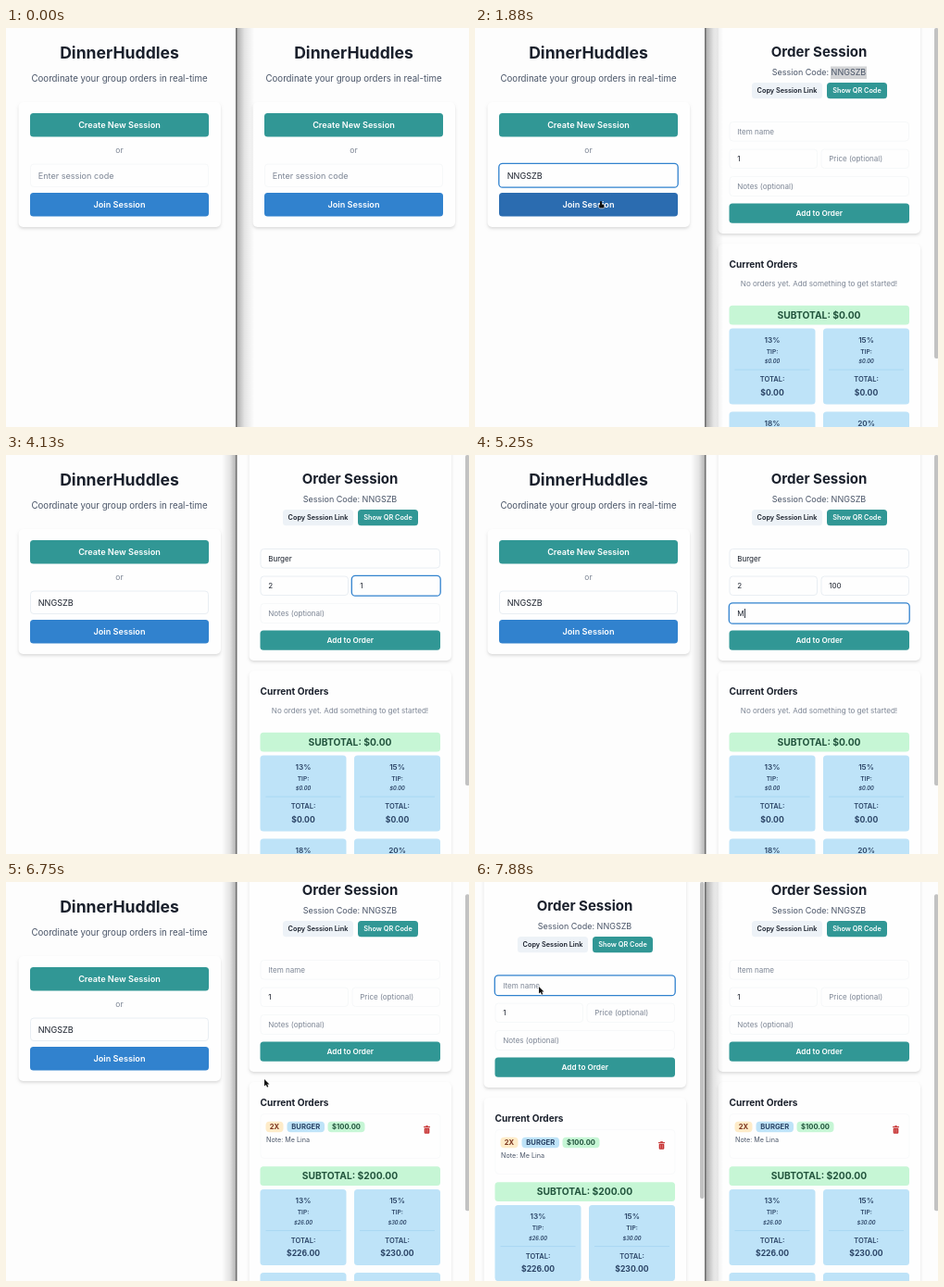
Write an HTML page with a canvas that moves like this. It is 500 px wide and 431 px high and loops after 8 s.

```html
<!DOCTYPE html>
<html lang="en">
<head>
<meta charset="utf-8">
<title>Group order demo</title>
<style>
  html, body { margin: 0; width: 100%; height: 100%; overflow: hidden; background: #fdfdfd; }
  canvas { display: block; }
</style>
</head>
<body>
<canvas id="stage" width="500" height="431"></canvas>
<script>
const ctx = document.getElementById('stage').getContext('2d');
const W = 500, H = 431, LOOP = 8000, STEP = 125, PANE = 253;
const CODE = 'NNGSZB', NOTE = 'Me Lina';
const TEXT_DROP = .6;
const C = {
  page: '#fdfdfd', card: '#fefefe', ink: '#1a202c', body: '#4a5568', hint: '#7c8594',
  line: '#e9eef3', faint: '#f6f8f9', teal: '#319795', tealDark: '#2c7a7b',
  blue: '#3182ce', blueDark: '#2b6cb0', sky: '#bee3f8', skyInk: '#2a4365',
  mint: '#c6f6d5', mintInk: '#22543d'
};

// Pointer path: step, x, y
const POINTER = [
  [1, 80, 140], [3, 362, 106], [7, 361, 105], [9, 402, 47], [10, 402, 47],
  [12, 110, 158], [13, 112, 160], [15, 136, 187], [17, 138, 188], [21, 345, 60],
  [22, 345, 108], [25, 312, 137], [27, 304, 140], [47, 378, 185], [48, 375, 197],
  [50, 374, 200], [54, 279, 213], [57, 130, 190], [59, 128, 188], [62, 69, 113], [64, 69, 113]
];
const HIDDEN = [[0, 1], [23, 25], [28, 47]];

const within = (k, a, b) => k >= a && k < b;

function typed(text, k, start, end) {
  const part = (k - start + 1) / (end - start + 1);
  return text.slice(0, Math.floor(text.length * Math.max(0, Math.min(1, part))));
}

function box(x, y, w, h, fill, r = 3.5, stroke, width = 1) {
  ctx.beginPath();
  ctx.roundRect(x, y, w, h, r);
  if (fill) { ctx.fillStyle = fill; ctx.fill(); }
  if (stroke) { ctx.strokeStyle = stroke; ctx.lineWidth = width; ctx.stroke(); }
}

function text(str, x, y, size, color, { weight = 400, align = 'left', style = '' } = {}) {
  ctx.font = `${style} ${weight} ${size}px Inter, sans-serif`;
  ctx.textAlign = align;
  ctx.textBaseline = 'middle';
  ctx.fillStyle = color;
  ctx.fillText(str, x, y + TEXT_DROP);
  return ctx.measureText(str).width;
}

const centered = (str, x, y, size, color, weight = 400, style = '') =>
  text(str, x, y, size, color, { weight, style, align: 'center' });

function card(x, y, w, h) {
  ctx.save();
  ctx.shadowColor = 'rgba(0,0,0,.12)';
  ctx.shadowBlur = 3;
  ctx.shadowOffsetY = 2;
  box(x, y, w, h, C.card, 5);
  ctx.restore();
}

function button(label, x, y, w, h, fill, size, color = '#fff') {
  box(x, y, w, h, fill);
  centered(label, x + w / 2, y + h / 2, size, color, 600);
}

function field(x, y, w, h, size, value, hint, { focus, border = C.faint, caret } = {}) {
  if (focus) box(x - .2, y - .2, w + .4, h + .4, C.card, 4, C.blue, 1.3);
  else box(x + .5, y + .5, w - 1, h - 1, C.card, 3.5, border);
  const tw = text(value || hint, x + 8.7, y + h / 2, size, value ? C.ink : C.hint);
  if (caret) {
    ctx.fillStyle = C.ink;
    ctx.fillRect(x + 9.2 + tw, y + h / 2 - 5, .9, 10);
  }
}

function home({ code = '', focus = false, hoverCreate, hoverJoin }) {
  card(13.5, 80, 218.5, 135);
  centered('DinnerHuddles', 122.5, 27.3, 17.6, C.ink, 700);
  centered('Coordinate your group orders in real-time', 122.5, 54.5, 9.7, C.body);
  button('Create New Session', 26, 92, 193, 25.5, hoverCreate ? C.tealDark : C.teal, 9.15);
  centered('or', 122.5, 132, 8.5, C.hint);
  field(26, 146.5, 193, 25.5, 9.1, code, 'Enter session code', { focus, border: code ? C.line : C.faint });
  button('Join Session', 26, 178, 193, 25.5, hoverJoin ? C.blueDark : C.blue, 9.15);
}

function tipCard(x, y, percent, subtotal) {
  const money = v => '$' + v.toFixed(2);
  const tip = subtotal * percent / 100, mid = x + 46.5;
  box(x, y, 93, 82, C.sky);
  centered(percent + '%', mid, y + 12, 8.2, C.skyInk, 600);
  centered('TIP:', mid, y + 24.5, 6.6, C.skyInk, 600);
  centered(money(tip), mid, y + 35.2, 5.7, C.skyInk, 600, 'italic');
  ctx.fillStyle = '#a9d8f3';
  ctx.fillRect(x + 6, y + 44, 81, 1);
  centered('TOTAL:', mid, y + 55, 7.5, C.skyInk, 600);
  centered(money(subtotal + tip), mid, y + 69, 8.6, C.skyInk, 700);
}

function badge(label, x, y, w, fill, color) {
  box(x, y - 5.8, w, 11.6, fill, 4);
  centered(label, x + w / 2, y, 7.6, color, 700);
}

function trash(x, y) {
  ctx.fillStyle = '#c53030';
  ctx.fillRect(x - 3.5, y - 3.4, 7, 1.1);
  ctx.fillRect(x - 1.3, y - 4.3, 2.6, 1);
  box(x - 2.8, y - 1.7, 5.6, 5.9, '#c53030', 1);
  ctx.fillStyle = '#e9a5a5';
  for (const dx of [-1.4, .8]) ctx.fillRect(x + dx, y - .8, .6, 4);
}

function orderRow() {
  box(22, 267.5, 194, 48, null, 4, '#f9fafb');
  badge('2X', 27.5, 281.5, 19, '#feebc8', '#7b341e');
  badge('BURGER', 50.5, 281.5, 40.5, C.sky, C.skyInk);
  badge('$100.00', 94.5, 281.5, 40, C.mint, C.mintInk);
  text('Note: ' + NOTE, 28, 295.3, 7.2, C.body);
  trash(201.5, 284.5);
}

function session({ connecting, selected, focus, item = '', qty = '1', price = '', note = '',
                   caret, border = {}, hoverAdd, ordered, scroll = 0, active }) {
  const subtotal = ordered ? 200 : 0;
  const drop = connecting ? 17 : 0;
  ctx.save();
  ctx.translate(0, -scroll);
  card(9.5, -20, 218.5, 242 + drop);
  if (selected) {
    ctx.fillStyle = active ? '#b4d5fe' : '#d2d3d5';
    ctx.fillRect(131, 41.5, 39, 13.5);
  }
  centered('Order Session', 118.5, 26.3, 15, C.ink, 700);
  centered('Session Code: ' + CODE, 118.5, 48, 9, C.body);
  button('Copy Session Link', 46, 59, 76, 17.3, '#edf2f7', 7.3, C.ink);
  button('Show QR Code', 127, 59, 65, 17.3, C.teal, 7.3);
  if (connecting) centered('Connecting to session...', 118.5, 86, 8.05, '#c05621');

  ctx.translate(0, drop);
  const edge = name => ({
    focus: focus === name,
    border: border[name] ? C.line : C.faint,
    caret: caret && focus === name
  });
  ctx.globalAlpha = connecting ? .4 : 1;
  field(21.5, 101, 194.5, 21.5, 8.05, item, 'Item name', edge('item'));
  field(21.5, 130.5, 95.5, 21.5, 8.05, qty, '', edge('qty'));
  field(120.5, 130.5, 95.5, 21.5, 8.05, price, 'Price (optional)', edge('price'));
  field(21.5, 160, 194.5, 22, 8.05, note, 'Notes (optional)', edge('note'));
  button('Add to Order', 21.5, 189.5, 194.5, 21.2, hoverAdd ? C.tealDark : C.teal, 8.2);
  ctx.globalAlpha = 1;

  card(9.5, 233, 218.5, 400);
  text('Current Orders', 21.5, 255, 10.1, C.ink, { weight: 700 });
  if (ordered) orderRow();
  else centered('No orders yet. Add something to get started!', 118.5, 275.6, 8.05, C.hint);

  const top = ordered ? 324.3 : 299.8;
  box(21.5, top, 194.5, 20.7, C.mint);
  centered(`SUBTOTAL: $${subtotal.toFixed(2)}`, 118.5, top + 10.2, 10.25, C.mintInk, 700);
  [13, 15, 18, 20].forEach((percent, i) =>
    tipCard(i % 2 ? 123 : 21.5, top + 24.8 + (i >> 1) * 90, percent, subtotal));
  ctx.restore();

  const thumb = ordered ? 342 : connecting ? 347 : 357;
  box(243, scroll * .78, 4.5, thumb, '#c2c2c2', 2);
}

function pane(x, w, draw, state) {
  ctx.save();
  ctx.beginPath();
  ctx.rect(x, 0, w, H);
  ctx.clip();
  ctx.fillStyle = C.page;
  ctx.fillRect(x, 0, w, H);
  ctx.translate(x ? PANE : 0, 0);
  draw(state);
  ctx.restore();
}

function divider(leftInFront) {
  const from = 249, to = leftInFront ? 268 : 233;
  const g = ctx.createLinearGradient(from, 0, to, 0);
  g.addColorStop(0, 'rgba(0,0,0,.32)');
  g.addColorStop(.45, 'rgba(0,0,0,.1)');
  g.addColorStop(1, 'rgba(0,0,0,0)');
  ctx.fillStyle = g;
  ctx.fillRect(Math.min(from, to), 0, Math.abs(to - from), H);
  ctx.fillStyle = '#6f6f6f';
  ctx.fillRect(248, 0, 1.5, H);
}

function pointerAt(k) {
  const i = Math.max(1, POINTER.findIndex(p => p[0] >= k));
  const [k0, x0, y0] = POINTER[i - 1], [k1, x1, y1] = POINTER[i];
  const u = Math.max(0, (k - k0) / (k1 - k0));
  const e = u * u * (3 - 2 * u);
  return [x0 + (x1 - x0) * e, y0 + (y1 - y0) * e];
}

function arrow(x, y) {
  const pts = [[0, 0], [0, 7.6], [1.8, 6], [3, 8.7], [4.3, 8.1], [3.1, 5.5], [5.5, 5.4]];
  ctx.beginPath();
  pts.forEach(([dx, dy]) => ctx.lineTo(x + dx, y + dy));
  ctx.closePath();
  ctx.lineWidth = 1.2;
  ctx.strokeStyle = '#fff';
  ctx.stroke();
  ctx.fillStyle = '#111';
  ctx.fill();
}

function hand(x, y) {
  box(x - 2.4, y + 3.2, 6.2, 4.6, '#111', 1.6, '#fff', .6);
  box(x - 1, y, 2, 5.5, '#111', 1);
}

function leftPane(k) {
  if (k < 59) {
    pane(0, 249, home, {
      code: k >= 13 ? CODE : '',
      focus: within(k, 12, 21),
      hoverJoin: within(k, 15, 18) || within(k, 57, 59)
    });
  } else {
    pane(0, 249, session, {
      connecting: k < 60, ordered: k >= 60, active: true, focus: k >= 62 ? 'item' : ''
    });
  }
}

function rightPane(k) {
  if (k < 4) return pane(249, 251, home, { hoverCreate: k === 3 });
  const filled = k < 50;
  const focus = !filled ? '' : k >= 37 ? 'note' : k >= 32 ? 'price' : k >= 27 ? 'qty' : k >= 22 ? 'item' : '';
  pane(249, 251, session, {
    focus,
    active: !within(k, 12, 21),
    connecting: k < 7,
    selected: within(k, 9, 21),
    item: filled ? typed('Burger', k, 23, 24) : '',
    qty: within(k, 30, 50) ? '2' : '1',
    price: filled ? typed('100', k, 33, 35) : '',
    note: filled ? typed(NOTE, k, 42, 46) : '',
    caret: within(k, 41, 47),
    border: {
      item: within(k, 22, 50), qty: within(k, 25, 50),
      price: within(k, 32, 50), note: within(k, 37, 50)
    },
    hoverAdd: within(k, 48, 51),
    ordered: k >= 50,
    scroll: k >= 53 ? 17 : 0
  });
}

function render(now) {
  const k = Math.floor((now % LOOP) / STEP);
  ctx.clearRect(0, 0, W, H);
  leftPane(k);
  rightPane(k);
  divider(k < 3 || within(k, 12, 21) || k >= 58);
  if (!HIDDEN.some(([a, b]) => within(k, a, b))) {
    const overButton = k === 3 || within(k, 15, 18) || within(k, 48, 51) || within(k, 57, 59);
    (overButton ? hand : arrow)(...pointerAt(k));
  }
}

let start;
function tick(now) {
  start ??= now;
  render(now - start);
  requestAnimationFrame(tick);
}
render(0);
requestAnimationFrame(tick);
</script>
</body>
</html>
```
